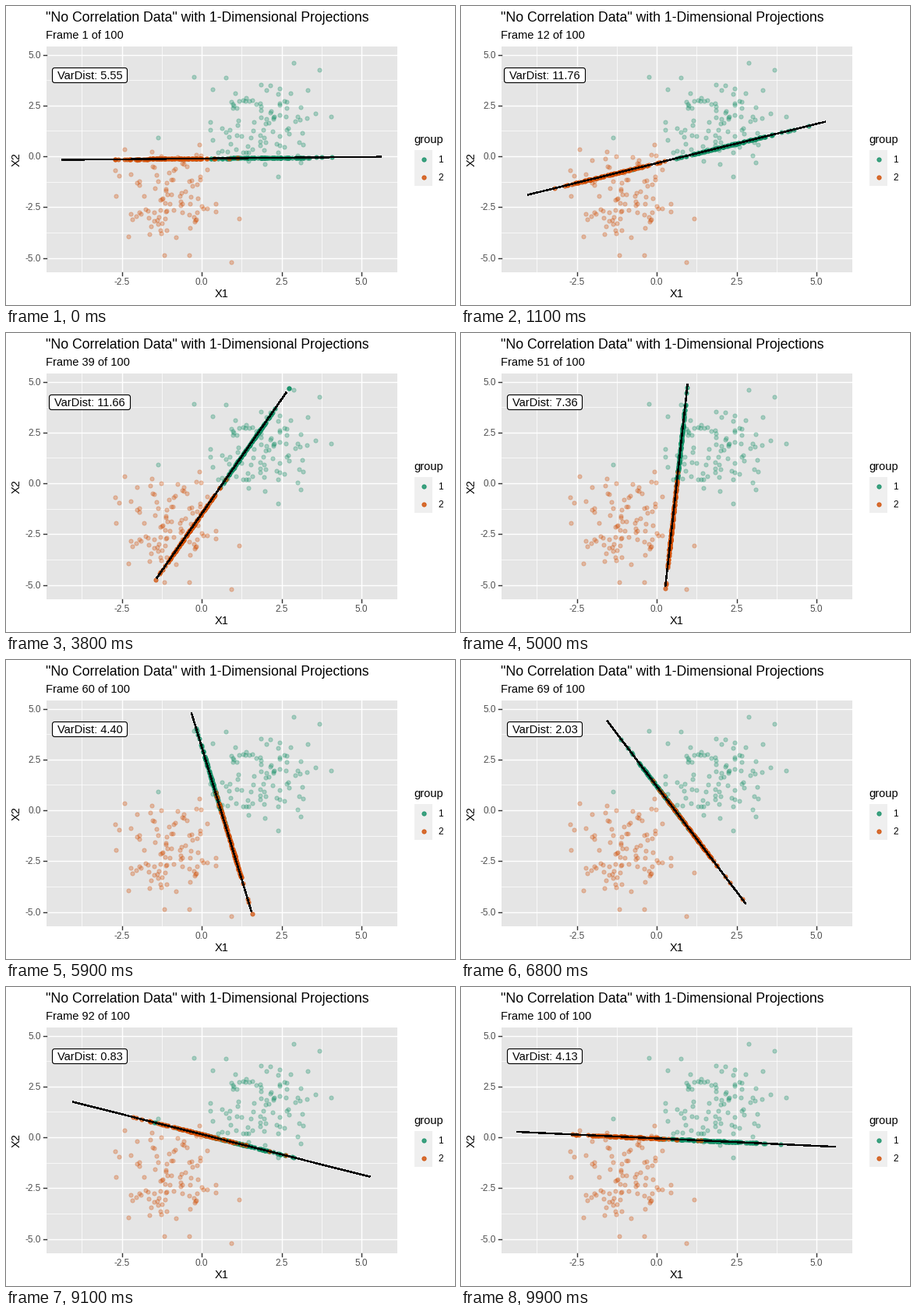
Animation of 576 by 384 pixels, one loop 10000 ms. Source, as a matplotlib script:

```python
import numpy as np
import matplotlib.pyplot as plt
from matplotlib.animation import FuncAnimation
from matplotlib.patches import FancyBboxPatch, Rectangle

W, H, DPI, FRAMES = 576, 384, 96, 100
LEFT, RIGHT, TOP, BOTTOM = 51.5, 502, 52, 342
ORIGIN, SCALE = np.array([251, 193]), np.array([41, -26.1])
COLORS = "#108E64", "#D14C01"
CENTER = np.array([0.62, -0.1])
REACH = 5

plt.rcParams["font.family"] = "Liberation Sans"
plt.rcParams["axes.unicode_minus"] = False


def to_data(px):
    return (np.asarray(px) - ORIGIN) / SCALE


def cluster(center, span, outer, rng, total=100):
    """A bounded random cloud plus a few outlying points."""
    mid, span = np.array(center), np.array(span)
    cloud = rng.triangular(mid - span, mid, mid + span,
                           (total - len(outer), 2))
    return to_data(np.vstack([outer, cloud]))


rng = np.random.default_rng(12)
groups = (
    cluster((334, 146), (78, 63),
            [(369, 73), (402, 82), (241, 91), (417, 142),
             (195, 169), (349, 219), (378, 201)], rng),
    cluster((206, 241), (70, 64),
            [(152, 184), (248, 178), (141, 244), (203, 320),
             (235, 320), (289, 329), (299, 273)], rng),
)

# Key poses of the projection axis: step and angle in degrees.
POSES = [(1, 0.858), (12, 21.118), (23, 35.5), (27, 46.1),
         (51, 86.02), (69, 115.72), (84, 141), (100, 175.78)]


def var_dist(deg):
    between = np.cos(np.radians(deg - 53.2)) ** 2
    within = 0.083 + 0.022 * np.cos(np.radians(2 * (deg - 113)))
    return between / within


def project(points, axis):
    return CENTER + np.outer((points - CENTER) @ axis, axis)


fig = plt.figure(figsize=(W / DPI, H / DPI), dpi=DPI, facecolor="white")
panel = fig.add_axes([LEFT / W, 1 - BOTTOM / H,
                      (RIGHT - LEFT) / W, (BOTTOM - TOP) / H])
x0, y0 = to_data((LEFT, BOTTOM))
x1, y1 = to_data((RIGHT, TOP))
panel.set(xlim=(x0, x1), ylim=(y0, y1), facecolor="#E5E5E5",
          xticks=[], yticks=[])
panel.spines[:].set_visible(False)

# Overlay in pixel units for text, ticks and legend.
stage = fig.add_axes([0, 0, 1, 1])
stage.set(xlim=(0, W), ylim=(H, 0))
stage.axis("off")


def write(x, y, text, size=11, **kw):
    return stage.text(x, y, text, fontsize=size, va="baseline", **kw)


def dots(ax, xy, color, alpha, z):
    return ax.scatter(*np.transpose(xy), s=3.9 ** 2, color=color,
                      alpha=alpha, linewidths=0.71, zorder=z)


# Grid, ticks and axis labels
for v in np.arange(-3.75, 5, 2.5):
    panel.axvline(v, color="white", lw=0.53, zorder=0)
    panel.axhline(v, color="white", lw=0.53, zorder=0)
for v in np.arange(-5, 6, 2.5):
    px, py = ORIGIN + SCALE * v
    panel.axhline(v, color="white", lw=1.07, zorder=0.5)
    stage.plot([LEFT - 3.7, LEFT], [py, py], color="#333333", lw=1.07)
    write(45, py + 4.2, f"{v:.1f}", 8.8, ha="right", color="#4D4D4D")
    if v > -5:
        panel.axvline(v, color="white", lw=1.07, zorder=0.5)
        stage.plot([px, px], [BOTTOM, BOTTOM + 3.7], color="#333333", lw=1.07)
        write(px, 358, f"{v:.1f}", 8.8, ha="center", color="#4D4D4D")
write(277, 374, "X1", ha="center")
write(18, 197, "X2", ha="center", rotation=90, rotation_mode="anchor")

# Titles and legend
write(50.7, 20, '"No Correlation Data" with 1-Dimensional Projections', 13.2)
subtitle = write(50.7, 42, "")
write(523.5, 176, "group")
for i, color in enumerate(COLORS):
    y = 185 + 23 * i
    stage.add_patch(Rectangle((524, y), 23, 23, color="#EFEFEF", lw=0))
    for alpha in (0.3, 0.7):
        dots(stage, [(535.5, y + 11.5)], color, alpha, 3)
    write(554, y + 15.7, str(i + 1), 8.8)

# Data, projections and the axis itself
for pts, color in zip(groups, COLORS):
    dots(panel, pts, color, 0.3, 2)
shadows = [dots(panel, pts, color, 0.7, 3)
           for pts, color in zip(groups, COLORS)]
line, = panel.plot([], [], color="black", lw=1.07, zorder=4,
                   antialiased=False, solid_capstyle="butt")

box = FancyBboxPatch((0, 0), 1, 1, fc="white", ec="black", lw=0.85,
                     boxstyle="round,pad=0,rounding_size=2.9")
stage.add_patch(box)
label = write(107.5, 94, "", ha="center")


def update(i):
    deg = np.interp(i + 1, *np.transpose(POSES))
    axis = np.array([np.cos(np.radians(deg)), np.sin(np.radians(deg))])
    for pts, shadow in zip(groups, shadows):
        shadow.set_offsets(project(pts, axis))
    line.set_data(*np.transpose([CENTER - REACH * axis,
                                 CENTER + REACH * axis]))
    subtitle.set_text(f"Frame {i + 1} of {FRAMES}")
    text = f"VarDist: {var_dist(deg):.2f}"
    label.set_text(text)
    half = 48 + 4 * (len(text) - 13)
    box.set_bounds(107.5 - half, 79.5, 2 * half, 19)
    return [*shadows, line, subtitle, label, box]


anim = FuncAnimation(fig, update, frames=FRAMES, interval=100,
                     repeat=True, repeat_delay=0, blit=False)
plt.show()
```
